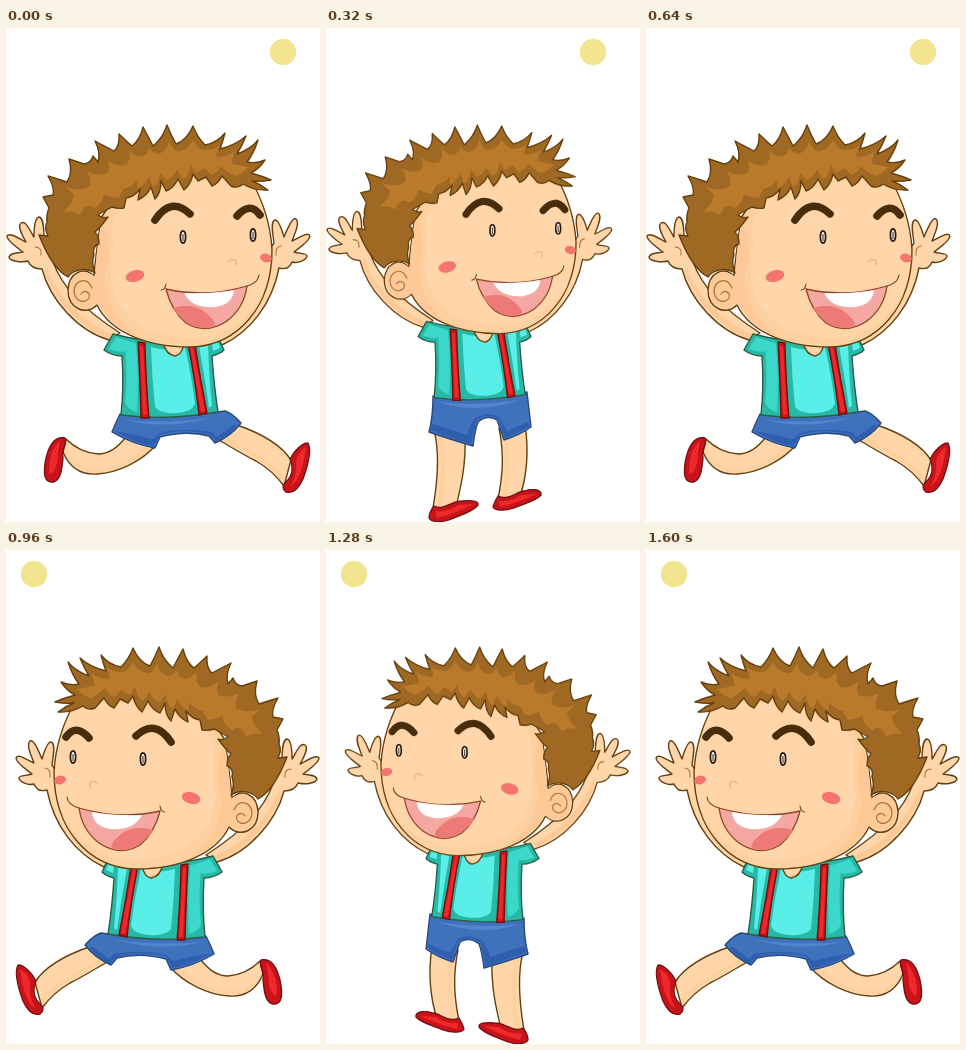
Write an HTML page without scripts that moves like this. It is 314 px wide and 494 px high and loops after 1.92 s.

```html
<!DOCTYPE html>
<html lang="en">
<head>
<meta charset="utf-8">
<title>Jumping boy</title>
<style>
html, body { margin: 0; width: 100%; height: 100%; overflow: hidden; background: #fff; }
svg { display: block; width: 100vw; height: 100vh; }
.line { stroke: #64400f; stroke-width: 1.4; stroke-linejoin: round; stroke-linecap: round; }
.skin { fill: #ffd6a9; }
.shade { fill: #fdca97; }
.soft { fill: #fed0a0; }
.thin { fill: none; stroke: #a9713a; stroke-width: 1.2; stroke-linecap: round; }
.red { fill: #c9131a; stroke: #701010; stroke-width: 1.3; stroke-linejoin: round; }
.blue { fill: #3f72bd; stroke: #284a80; stroke-width: 1.4; stroke-linejoin: round; }
.navy { fill: #305eae; }
.sky { fill: #5585d0; }
.glow { fill: #ee292b; }
.pose, .ball { animation: 1920ms step-end infinite; }
.pose { visibility: hidden; }
.run { animation-name: run; }
.stand { animation-name: stand; }
.run-back { animation-name: run-back; }
.stand-back { animation-name: stand-back; }
.ball { fill: #f2e58f; animation-name: ball; }
@keyframes run { 0%, 33.333% { visibility: visible } 16.666%, 50%, 100% { visibility: hidden } }
@keyframes stand { 0%, 33.333%, 100% { visibility: hidden } 16.666% { visibility: visible } }
@keyframes run-back { 0%, 66.666% { visibility: hidden } 50%, 83.333%, 100% { visibility: visible } }
@keyframes stand-back { 0%, 83.333%, 100% { visibility: hidden } 66.666% { visibility: visible } }
@keyframes ball {
  0%, 33.333% { transform: translateX(277px) }
  16.666% { transform: translateX(267px) }
  50%, 100% { transform: translateX(28px) }
}
</style>
</head>
<body>
<svg viewBox="0 0 314 494">
<defs>
  <g id="arms">
    <path class="skin line" d="M36 241C28 241 24 238 22 233C14 235 4 233 3 229C4 225 11 225 17 224C10 219 1 212 1 208C3 204 12 210 20 214C16 207 11 198 15 195C20 192 24 203 28 209C28 200 29 190 33 189C39 190 37 206 39 215C43 222 45 229 47 234C56 258 75 280 114 305L103 312C72 303 44 272 36 241Z"/>
    <path class="shade" d="M38 242C47 271 74 300 103 310L107 307C77 294 50 267 41 239Z"/>
    <path class="skin line" d="M273 240C280 242 284 239 286 234C293 236 301 231 301 228C301 225 293 226 288 224C294 219 304 213 304 208C302 203 293 210 286 213C289 205 294 195 290 191C286 189 281 202 278 209C276 202 273 192 269 192C264 193 267 207 268 215C262 222 261 232 261 241C254 273 234 294 207 308L216 317C244 304 266 276 273 240Z"/>
    <path class="shade" d="M263 226C258 255 248 284 212 309L216 313C245 297 262 266 263 226Z"/>
    <path class="thin" d="M29 219Q36 219 35 227M275 218Q269 219 270 227"/>
  </g>

  <g id="shirt">
    <path d="M107 306L98 322Q106 328 116 328Q118 360 115 387Q160 393 212 384Q208 358 206 328Q214 326 218 322L212 309Q160 320 107 306Z" fill="#27b9a6" stroke="#2b5b45" stroke-width="1.4"/>
    <path d="M110 309L103 321Q110 324 117 324L131 316ZM119 318Q122 350 119 374Q122 382 131 384Q133 350 130 316Z" fill="#3cd8ca"/>
    <path d="M145 319Q162 324 179 319Q186 350 189 376Q186 384 171 385Q154 386 149 379Q146 350 145 319ZM193 318L202 316Q203 350 206 378L203 380Q199 350 193 318ZM206 315L207 323L214 320L211 312Z" fill="#5aeee8"/>
    <path class="skin line" d="M157 314Q160 327 169 328Q176 327 178 315Z"/>
    <path class="red" d="M132 314L139 315Q140 355 143 390L135 390Q134 350 132 314ZM182 316L189 316Q194 350 201 385L193 387Q189 350 182 316Z"/>
    <path class="glow" d="M134 318L137 318L141 387L137 387ZM184 319L187 319L199 383L195 384Z"/>
  </g>

  <g id="head">
    <path class="skin line" d="M95 190C91 218 89 235 88 248C78 238 63 244 62 262C62 281 80 288 91 277C103 302 137 319 184 319C233 318 266 277 266 222C265 201 258 174 243 148L190 135L115 160Z"/>
    <path class="soft" d="M97 190C91 228 89 258 93 276C105 301 137 317 184 317C218 317 246 295 258 265C241 295 213 311 184 310C145 309 119 295 109 267C101 250 107 237 105 222C112 216 101 208 108 202C103 197 109 190 112 182L124 172L138 168L158 155L181 163L190 149L205 156L214 148L237 159L247 158L190 138L115 162Z"/>
    <path class="shade" d="M95 195Q90 225 89 249C78 239 64 246 64 262C64 279 80 286 92 275C100 291 114 303 136 311C115 299 103 280 101 262C94 250 106 235 102 222Q104 205 95 195Z"/>
    <path class="thin" d="M86 260C81 248 69 252 68 263C69 274 79 276 83 270C85 264 78 261 75 266"/>
    <path class="line" fill="#9f6823" d="M62 249C49 242 40 225 33 207L42 208Q38 200 41 194Q40 187 43 180L37 169L47 167Q49 160 42 148L61 154Q67 145 63 131L78 136Q85 135 87 128L92 134Q95 125 89 113L108 123Q114 118 113 106Q120 113 126 118Q134 112 137 99Q142 108 147 118Q157 110 161 97Q165 107 170 116Q181 112 187 98Q191 109 199 117Q211 115 219 105Q217 113 214 121Q230 117 240 108Q236 118 231 126Q245 121 252 112Q248 125 241 134Q250 136 259 132Q253 141 245 145Q256 148 265 152Q254 154 246 153Q254 156 262 162Q249 163 237 156Q232 161 225 158L216 148Q212 156 206 158L200 149L192 153L187 146Q185 156 178 162L172 151Q168 160 160 163L155 153Q155 165 149 171L145 159Q141 168 132 172L134 161Q128 169 120 170L118 180Q112 181 106 179Q97 184 92 187Q98 191 102 189Q94 200 89 204Q93 208 93 216Q86 218 88 227Q85 235 89 245C78 238 66 243 62 249Z"/>
    <path fill="#b97b2b" d="M57 184Q67 176 68 167L60 159Q74 164 84 158Q86 150 80 143Q93 149 101 145Q105 139 101 131Q113 141 121 136Q125 131 123 122Q132 131 138 128Q142 125 143 120Q149 128 155 125Q161 122 163 113Q168 125 174 123Q183 121 187 112Q193 124 201 122Q210 121 214 117Q209 127 211 129Q223 128 229 123Q225 132 226 136L243 139Q235 147 229 148Q219 143 215 138Q211 146 205 147L199 140L190 145L185 137Q182 150 177 151L171 142Q165 152 160 152L154 144Q153 157 147 159L143 149Q137 160 131 160L132 152Q124 160 117 161L113 170Q103 169 98 166Q95 178 88 180Q79 173 74 187Q66 182 57 184Z"/>
    <path d="M149 192Q165 168 184 186M231 188Q244 173 254 187" fill="none" stroke="#492d0b" stroke-width="7.6" stroke-linecap="round"/>
    <g fill="#fff" stroke="#2c1b0c" stroke-width="1.8">
      <ellipse cx="177" cy="209" rx="2.6" ry="6"/>
      <ellipse cx="247" cy="207" rx="2.6" ry="6"/>
    </g>
    <path d="M177 206v7M247 204v7" stroke="#4a443c" stroke-width="1.2"/>
    <path class="thin" d="M222 234Q227 230 230 233Q231 236 229 238" style="stroke:#efb27c"/>
    <g fill="#f4756e">
      <ellipse cx="129" cy="248" rx="9.5" ry="5.8" transform="rotate(-15 129 248)"/>
      <ellipse cx="260" cy="230" rx="6" ry="4.3" transform="rotate(15 260 230)"/>
    </g>
    <path fill="#f5a8a2" stroke="#8d4326" stroke-width="1.3" d="M160 261Q200 270 241 258Q238 280 221 293Q200 307 180 295Q165 282 160 261Z"/>
    <path fill="#ee7a78" d="M167 280Q191 272 207 292Q210 297 207 299Q193 303 180 294Q172 288 167 280Z"/>
    <path fill="#fff" d="M178 265Q205 266 228 262Q227 276 210 279Q186 281 178 265Z"/>
    <path class="thin" d="M155 262Q159 262 160 256M241 258Q252 255 253 247" style="stroke:#7a4a20"/>
  </g>

  <g id="top">
    <use href="#arms"/><use href="#shirt"/><use href="#head"/>
  </g>

  <g id="run">
    <path class="skin line" d="M120 409C111 420 103 426 92 426C79 425 69 420 60 411L57 424C64 441 76 447 91 446C112 445 136 433 150 417Z"/>
    <path class="soft" d="M59 425C66 440 79 445 91 444C113 442 133 432 146 418L142 417C124 432 106 441 89 441C76 440 66 434 59 424Z"/>
    <path class="skin line" d="M231 397C254 405 274 415 285 432L278 458C270 447 262 440 250 433C236 426 225 419 211 411Z"/>
    <path class="soft" d="M215 411C235 422 260 432 277 453L278 448C264 430 240 422 220 408Z"/>
    <path class="red" d="M59 410C48 408 42 418 39 435C37 450 40 455 48 454C55 451 56 441 57 430C55 421 62 415 59 410ZM284 431C289 421 297 415 302 415C306 422 301 440 297 451C292 462 287 466 280 464C276 461 276 457 280 454C287 447 287 438 284 431Z"/>
    <path class="glow" d="M54 413Q43 422 43 445Q48 447 51 435Q52 421 54 413ZM300 419Q291 424 290 434Q292 446 284 459Q296 452 300 419Z"/>
    <path class="blue" d="M114 386Q109 396 106 404Q126 416 149 420L154 409Q180 402 203 408L209 415Q225 408 235 395Q226 385 219 383Q165 391 114 386Z"/>
    <path class="navy" d="M109 403Q127 406 147 411L154 405Q175 399 206 404L211 409L227 397L231 397Q222 409 210 413L203 406Q178 400 153 407L148 418Q125 414 109 403Z"/>
    <path class="sky" d="M119 392Q160 396 203 390Q160 402 119 392Z"/>
    <use href="#top"/>
  </g>

  <g id="stand">
    <path class="skin line" d="M108 402C114 425 112 451 107 480L130 479C135 458 140 437 139 410ZM173 400C179 429 176 451 172 471L194 469C201 447 203 423 199 396Z"/>
    <path class="soft" d="M111 407C117 433 116 454 111 477L116 477C120 453 119 431 117 410ZM177 409C181 430 179 453 176 469L181 469C184 448 183 427 182 405Z"/>
    <path class="red" d="M108 478C118 483 125 473 136 473C146 472 153 473 152 477C147 484 134 487 123 492C114 495 105 494 103 490C103 486 105 482 108 478ZM172 468C182 473 190 464 198 463C208 460 216 462 215 467C210 473 199 475 188 480C179 483 169 483 167 479C168 475 170 471 172 468Z"/>
    <path class="glow" d="M109 483Q122 485 132 477L147 476Q131 485 111 490ZM173 473Q186 474 195 467L210 466Q195 474 174 479Z"/>
    <path class="blue" d="M107 368Q107 389 103 404Q123 411 147 418Q149 402 152 394Q161 386 171 392L178 412Q192 408 205 399Q203 382 201 364Q153 375 107 368Z"/>
    <path class="navy" d="M106 396Q124 401 141 407Q144 395 150 390Q162 383 173 389L181 403L202 394L203 398Q191 406 179 410L173 391Q160 384 150 393L145 416Q122 409 105 402Z"/>
    <path class="sky" d="M112 374Q150 379 193 372Q150 387 112 374Z"/>
    <use href="#top" transform="translate(0 5.8) scale(.94)"/>
  </g>
</defs>

<circle class="ball" cx="0" cy="24" r="13.2"/>
<use class="pose run" href="#run"/>
<use class="pose stand" href="#stand"/>
<use class="pose run-back" href="#run" transform="translate(314 0) scale(-1 1)"/>
<use class="pose stand-back" href="#stand" transform="translate(305 0) scale(-1 1)"/>
</svg>
</body>
</html>
```
